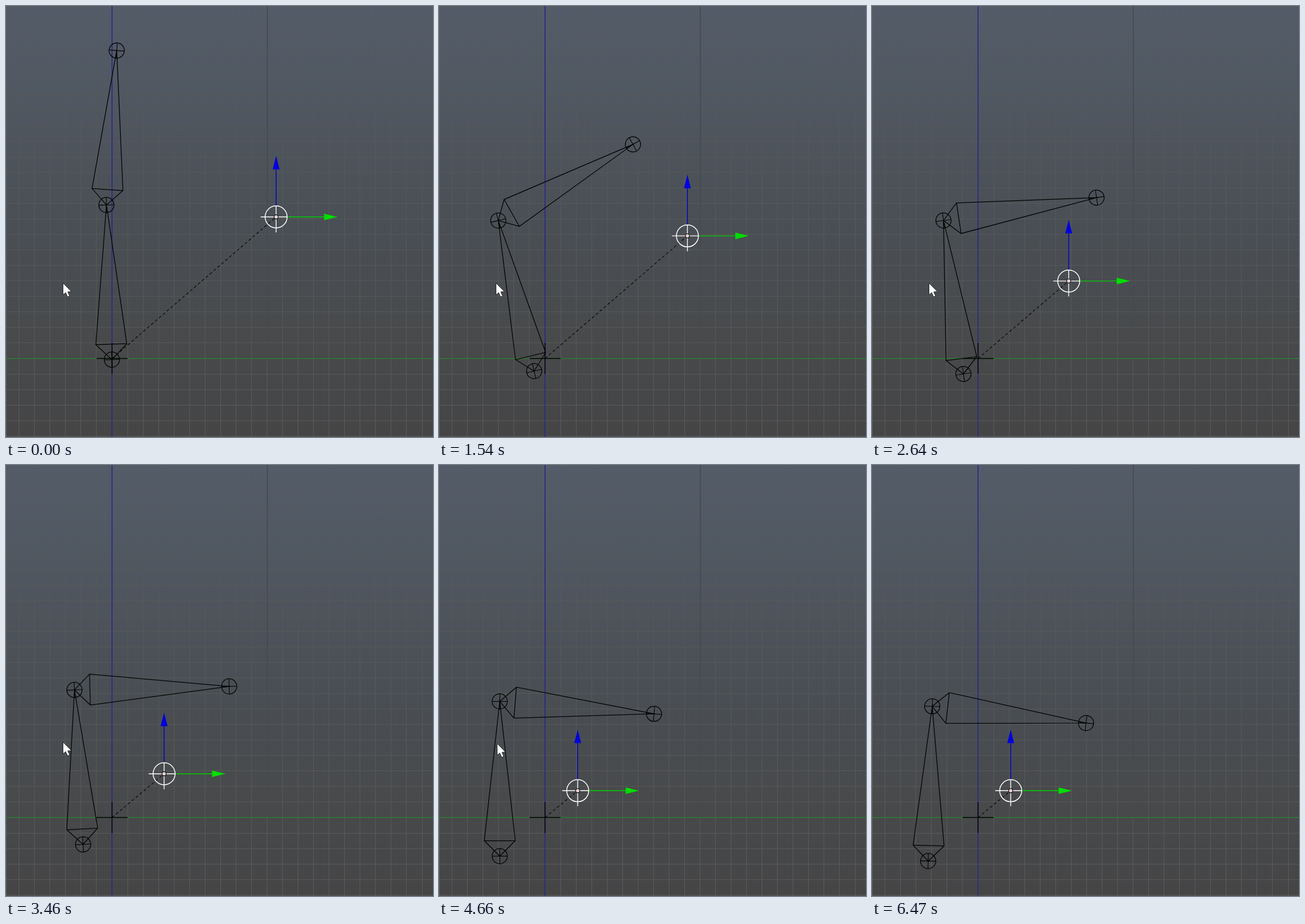
Animation, 745 px wide and 752 px high, one loop 6570 ms. Source, as an HTML page with a canvas:

```html
<!DOCTYPE html>
<html lang="en">
<head>
<meta charset="utf-8">
<title>Two-bone chain</title>
<style>
html, body { margin: 0; width: 100%; height: 100%; overflow: hidden; background: #4b4f54; }
canvas { display: block; width: 745px; height: 752px; }
</style>
</head>
<body>
<canvas id="stage" width="745" height="752"></canvas>
<script>
const W = 745, H = 752, LOOP = 6570;
const ORIGIN = { x: 185, y: 615 };
const CELL = 27.05, BONE = 270;
const ctx = document.getElementById('stage').getContext('2d');

// [time in ms, step]; steps are evenly spaced in between
const CLOCK = [
  [600, 1], [1050, 5], [1170, 6], [1280, 7], [1910, 12], [2030, 13],
  [2640, 18], [2760, 19], [3350, 24], [3460, 25], [4060, 30], [4180, 31],
  [4660, 35], [4800, 36], [5400, 41], [5520, 42], [6120, 47], [6230, 48], [6470, 50]
];

// [step, root x, root y, lower angle, upper angle]; angles in degrees from upright
const POSES = [
  [0, 184.7, 617, -2, 3.8],
  [3, 178, 636, -6.2, 21],
  [5, 170, 647, -9.7, 39],
  [6, 167.5, 645.5, -11, 45.3],
  [9, 166, 637, -13.4, 60.5],
  [12, 172, 627, -13.6, 72],
  [13, 173.5, 625, -13, 74.2],
  [18, 159.5, 642, -7.4, 81.5],
  [25, 134.5, 662, -3.2, 88.7],
  [30, 117, 674.5, -1.1, 92],
  [35, 106, 682.5, 0, 94.6],
  [41, 99.5, 689, 1.2, 95.9],
  [50, 98, 691, 1.5, 96.2]
];

// [first step, x, y]; the pointer leaves after the last one
const POINTER = [[0, 99, 483], [34, 101, 485.5], [40, 96, 425], [41, 88, 360], [42, 76, 342]];
const POINTER_END = 43;

function stepAt(ms) {
  if (ms < CLOCK[0][0]) return 0;
  for (let i = 1; i < CLOCK.length; i++) {
    const [t0, s0] = CLOCK[i - 1], [t1, s1] = CLOCK[i];
    if (ms < t1) return Math.floor(s0 + (s1 - s0) * (ms - t0) / (t1 - t0) + 1e-6);
  }
  return 50;
}

function slope(i, col) {
  const a = POSES[Math.max(i - 1, 0)], b = POSES[Math.min(i + 1, POSES.length - 1)];
  return (b[col] - a[col]) / (b[0] - a[0]);
}

// Cubic Hermite curve through the poses
function poseValue(step, col) {
  let i = 0;
  while (i < POSES.length - 2 && step >= POSES[i + 1][0]) i++;
  const a = POSES[i], b = POSES[i + 1], span = b[0] - a[0];
  const u = (step - a[0]) / span, v = 1 - u;
  return v * v * (1 + 2 * u) * a[col] + u * u * (3 - 2 * u) * b[col]
    + span * u * v * (v * slope(i, col) - u * slope(i + 1, col));
}

function targetAt(step) {
  const t = Math.min(Math.max((step - 0.75) / 32, 0), 1);
  const k = t * t * (3 - 2 * t);
  return { x: 471.3 - 229.3 * k, y: 368 + 200.3 * k };
}

function line(x1, y1, x2, y2, color, width = 1) {
  ctx.strokeStyle = color;
  ctx.lineWidth = width;
  ctx.beginPath();
  ctx.moveTo(x1, y1);
  ctx.lineTo(x2, y2);
  ctx.stroke();
}

function shape(points, fill) {
  ctx.beginPath();
  points.forEach(([x, y]) => ctx.lineTo(x, y));
  ctx.closePath();
  if (fill) {
    ctx.fillStyle = fill;
    ctx.fill();
  }
}

function ring(x, y, r, color, width) {
  ctx.strokeStyle = color;
  ctx.lineWidth = width;
  ctx.beginPath();
  ctx.arc(x, y, r, 0, Math.PI * 2);
  ctx.stroke();
}

const crisp = v => Math.floor(v) + 0.5;

function drawGrid() {
  const sky = ctx.createLinearGradient(0, 0, 0, H);
  sky.addColorStop(0, '#535c68');
  sky.addColorStop(0.2, '#505862');
  sky.addColorStop(0.5, '#4a4f55');
  sky.addColorStop(0.75, '#484a4c');
  sky.addColorStop(1, '#454546');
  ctx.fillStyle = sky;
  ctx.fillRect(0, 0, W, H);

  const ink = ctx.createLinearGradient(0, 0, 0, H);
  ink.addColorStop(0, 'rgba(88,88,86,0.35)');
  ink.addColorStop(0.185, 'rgba(88,88,86,0.45)');
  ink.addColorStop(0.2, 'rgba(88,89,86,0.8)');
  ink.addColorStop(1, 'rgba(92,93,90,0.9)');
  for (let k = -6; k <= 20; k++) {
    const x = crisp(ORIGIN.x + k * CELL);
    line(x, 0, x, H, ink);
  }
  for (let k = -22; k <= 5; k++) {
    const y = crisp(ORIGIN.y + k * CELL);
    line(0, y, W, y, ink);
  }
  line(0.5, 0, 0.5, H, '#5c5e5c');
  line(0, 0.5, W, 0.5, '#5c5e5c');
  line(456, 0, 456, ORIGIN.y, '#45484b', 1.5);
  line(0, ORIGIN.y, W, ORIGIN.y, '#2a7a2c', 1.4);
  line(185, 0, 185, H, '#20228e', 1.4);
}

function drawJoint(x, y, angle) {
  ctx.save();
  ctx.translate(x, y);
  ctx.rotate(angle);
  ring(0, 0, 13.3, '#000', 1.25);
  line(-13, 0, 13, 0, '#000', 1.1);
  line(0, -13, 0, 13, '#000', 1.1);
  ctx.restore();
}

// Draws a bone and returns its far end
function drawBone(x, y, angle) {
  ctx.save();
  ctx.translate(x, y);
  ctx.rotate(angle);
  ctx.strokeStyle = '#000';
  ctx.lineWidth = 1.25;
  shape([[0, 0], [-27, -27], [0, -BONE], [27, -27]]);
  ctx.stroke();
  line(-27, -27, 27, -27, '#000', 1.25);
  ctx.restore();
  const end = { x: x + BONE * Math.sin(angle), y: y - BONE * Math.cos(angle) };
  drawJoint(end.x, end.y, angle);
  return end;
}

function drawChain(step) {
  const [x, y, lower, upper] = [1, 2, 3, 4].map(col => poseValue(step, col));
  const rad = Math.PI / 180;
  drawJoint(x, y, lower * rad);
  const mid = drawBone(x, y, lower * rad);
  drawBone(mid.x, mid.y, upper * rad);
}

function drawTarget({ x, y }) {
  ctx.setLineDash([5, 4]);
  line(ORIGIN.x, ORIGIN.y, x, y, '#000', 1.1);
  ctx.setLineDash([]);

  ctx.save();
  ctx.translate(x, y);
  line(-27, 0, 20, 0, '#fff', 1.4);
  line(0, -20, 0, 27, '#fff', 1.4);
  line(0, -19, 0, -84, '#0000c8', 1.4);
  line(19, 0, 84, 0, '#00d000', 1.4);
  shape([[0, -106.5], [-6, -83], [6, -83]], '#0000dc');
  shape([[107, 0], [83.5, -5.8], [83.5, 5.8]], '#00dc00');
  ring(0, 0, 19.2, '#fff', 1.5);
  ctx.fillStyle = '#e6cfd2';
  ctx.beginPath();
  ctx.arc(0, 0, 3.4, 0, Math.PI * 2);
  ctx.fill();
  ring(0, 0, 3.6, '#000', 1.1);
  ctx.restore();
}

function drawPointer(step) {
  if (step >= POINTER_END) return;
  const [, x, y] = POINTER.filter(p => p[0] <= step).pop();
  ctx.save();
  ctx.translate(x, y);
  shape([[0.5, 0.5], [0.5, 21], [5, 17], [8.5, 24.5], [12, 23], [8.8, 15.8], [15, 15.3]], '#fff');
  ctx.strokeStyle = '#26282a';
  ctx.lineWidth = 1;
  ctx.stroke();
  ctx.restore();
}

function draw(step) {
  drawGrid();
  line(158, ORIGIN.y, 212, ORIGIN.y, '#000', 1.4);
  line(ORIGIN.x, 588, ORIGIN.x, 642, '#000', 1.4);
  drawChain(step);
  drawTarget(targetAt(step));
  drawPointer(step);
}

const start = performance.now();
function tick() {
  draw(stepAt((performance.now() - start) % LOOP));
  requestAnimationFrame(tick);
}
tick();
</script>
</body>
</html>
```
